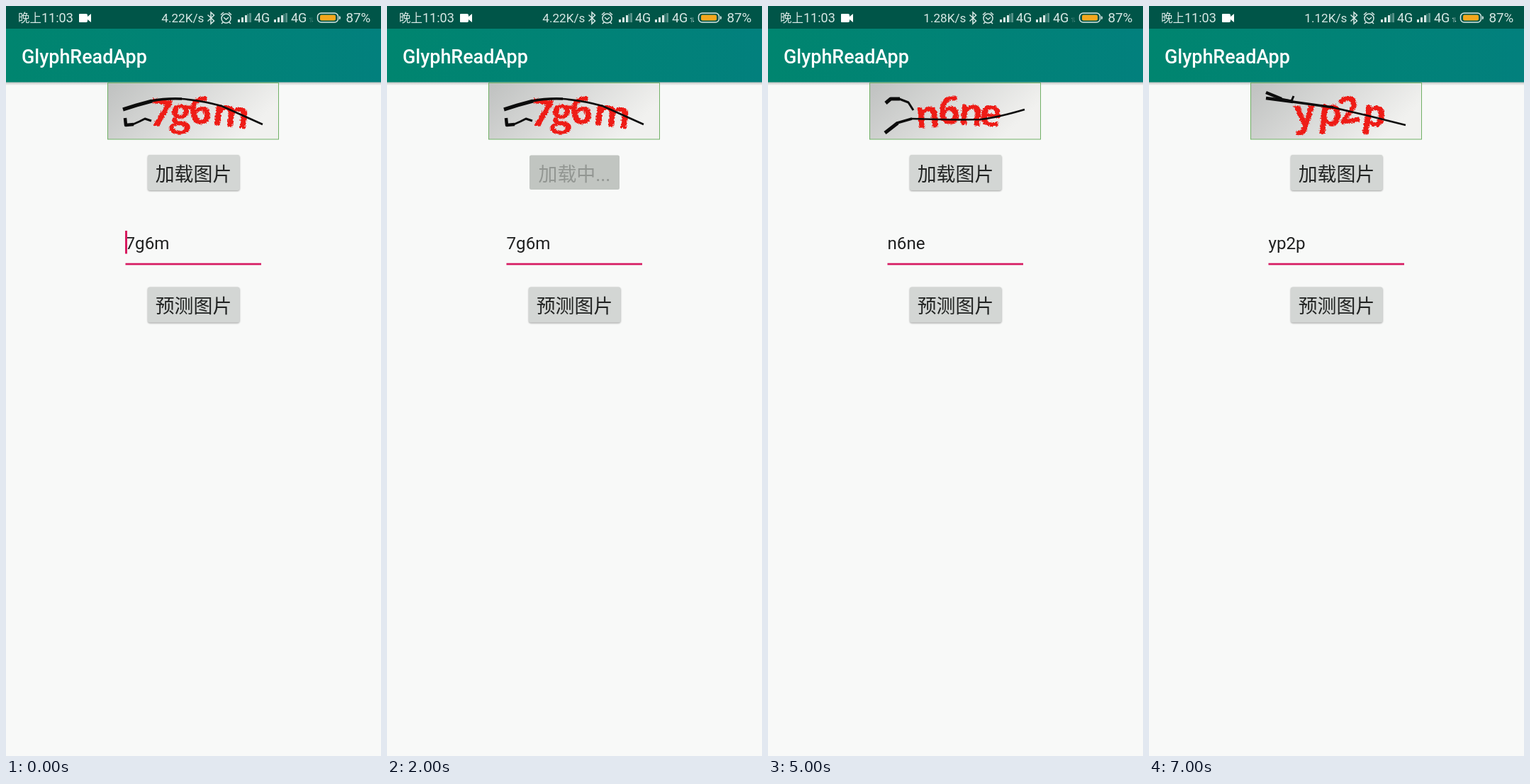
An HTML page that plays this animation: 529 px wide and 1058 px high, repeating every 8 s.

```html
<!DOCTYPE html>
<html lang="zh-CN">
<head>
<meta charset="utf-8">
<style>
html, body { margin: 0; width: 100%; height: 100%; overflow: hidden; background: #f8f9f8; }
svg { display: block; width: 100%; height: 100%; font-family: Roboto, "Noto Sans CJK SC", "Noto Sans CJK", sans-serif; }
.status { fill: #d8e8e5; font-size: 18px; }
.label { font-size: 26.9px; text-anchor: middle; fill: #212322; }
.code { font: 700 53px "Open Sans", sans-serif; text-anchor: middle; fill: #ee1a17; }
.ink { fill: none; stroke: #0c0c0c; stroke-linejoin: round; }
</style>
</head>
<body>
<svg viewBox="0 0 529 1058">
  <defs>
    <linearGradient id="bar"><stop stop-color="#00856f"/><stop offset="1" stop-color="#02807d"/></linearGradient>
    <linearGradient id="paper" x2="1" y2=".35"><stop stop-color="#bfc1c0"/><stop offset="1" stop-color="#f1f1ef"/></linearGradient>
    <linearGradient id="fade" x2="0" y2="1"><stop stop-color="#000" stop-opacity=".24"/><stop offset="1" stop-color="#000" stop-opacity="0"/></linearGradient>
    <filter id="rough">
      <feTurbulence baseFrequency=".35" numOctaves="1" seed="4"/>
      <feDisplacementMap in="SourceGraphic" scale="4" xChannelSelector="R" yChannelSelector="G"/>
    </filter>
    <filter id="soft" x="-10%" y="-20%" width="120%" height="140%"><feGaussianBlur stdDeviation="1.2"/></filter>
    <g id="signal">
      <path d="M0 19h3v4h-3zM5 16h3v7h-3zM10 13h3v10h-3z"/>
      <path d="M13.5 11h1.5v12h-1.5zM16 10h3v13h-3z" opacity=".4"/>
    </g>
  </defs>

  <rect width="529" height="1058" fill="#f8f9f8"/>
  <rect y="107" width="529" height="5" fill="url(#fade)"/>
  <rect y="32" width="529" height="75.5" fill="url(#bar)"/>
  <rect width="529" height="32" fill="#005548"/>
  <text x="22" y="81" font-size="26.9" font-weight="500" fill="#fff">GlyphReadApp</text>

  <g class="status">
    <text x="17" y="23" font-size="16.5" style="font-size:16.5px">晚上</text>
    <text x="50" y="23">11:03</text>
    <path d="M104 11h9q2 0 2 2v2l5-4v12l-5-4v2q0 2-2 2h-9q-1 0-1-1v-10q0-1 1-1z" fill="#fff"/>
    <text id="speed" x="279.5" y="23" text-anchor="end" style="font-size:17.2px"></text>
    <g fill="none" stroke="#d8e8e5" stroke-width="1.5">
      <path d="M284.500 12.500l9 8.500-4.500 4v-16l4.500 4-9 8.500"/>
      <circle cx="310.500" cy="17.500" r="6.500"/>
      <path d="M307 16l3.500 3 3.500-3M303 12.500l4-3.500M318 12.500l-4-3.500M306 23l-2 2M315 23l2 2"/>
      <rect x="439.500" y="10" width="29" height="13" rx="5"/>
    </g>
    <rect x="443" y="12.500" width="22" height="8" rx="2" fill="#f4a71d"/>
    <path d="M470 14q2 0 2 2.500t-2 2.500z"/>
    <use href="#signal" x="327"/>
    <use href="#signal" x="378"/>
    <text x="350" y="23">4G</text>
    <text x="402" y="23">4G</text>
    <path id="arrows" d="M429 23v-5h-1.500l2-2v7zM432 16v5h1.500l-2 2v-7z"/>
    <text x="479.500" y="23" style="font-size:18.8px">87%</text>
  </g>

  <rect x="143.500" y="108.500" width="241" height="79.500" fill="url(#paper)" stroke="#71b066"/>
  <g id="pictures"></g>

  <g id="buttons"></g>

  <text id="field" x="168.500" y="343" font-size="24.2" fill="#1f2020"></text>
  <rect x="168.500" y="362.700" width="191.500" height="2.700" fill="#d61a61"/>
  <rect id="cursor" x="168" y="317" width="3" height="32.500" fill="#d81b60"/>
</svg>

<script>
const $ = id => document.getElementById(id);

// glyphs: [x, baseline, tilt] per character; strokes: [width, path]
const codes = [
  { text: '7g6m',
    glyphs: [[215, 168, 7], [244, 167, 5], [274, 165, -5], [314, 169, 7]],
    strokes: [[5, 'M165 146L184 140L206 134'], [3.6, 'M205 134Q225 130 248 131'],
      [2.6, 'M247 131Q275 133 304 141L362 167'],
      [4.5, 'M168 158L169 168L180 167'], [3, 'M179 167L188 163L196 159L205 162']] },
  { text: 'n6ne',
    glyphs: [[225, 170, -4], [254, 165, 0], [284, 167, 4], [311, 168, 6]],
    strokes: [[5, 'M166 137L173 131L186 131'], [3, 'M185 131L198 136L205 147'],
      [5, 'M165 179L183 165'], [3.5, 'M182 165L203 159'],
      [2.6, 'M202 159Q255 161 300 160Q325 157 362 146']] },
  { text: 'yp2p',
    glyphs: [[219, 168, -3], [253, 167, 5], [283, 164, -8], [314, 168, 8]],
    strokes: [[4.5, 'M165 122L187 131'], [3, 'M186 131L201 134L204 127'],
      [4.5, 'M165 130L203 135'], [3.5, 'M202 135L260 143'], [2.6, 'M259 143L310 155L362 168']] }
];

$('pictures').innerHTML = codes.map(({ text, glyphs, strokes }) => '<g>' +
  '<g class="code" filter="url(#rough)">' + glyphs.map(([x, y, tilt], i) =>
    `<text transform="translate(${x} ${y}) rotate(${tilt})">${text[i]}</text>`).join('') + '</g>' +
  strokes.map(([w, d]) => `<path class="ink" stroke-width="${w}" d="${d}"/>`).join('') +
  '</g>').join('');

function button(y, text, busy) {
  const label = fill => `<text class="label" x="264.500" y="${y + 36.5}" style="fill:${fill}">${text}</text>`;
  if (busy) return `<rect x="201" y="${y + .5}" width="127" height="48.500" rx="2.500" fill="#c1c5c1"/>` + label('#929692');
  return `<rect x="200" y="${y + 1}" width="129.500" height="50" rx="3" opacity=".35" filter="url(#soft)"/>` +
    `<rect x="200" y="${y}" width="129.500" height="50" rx="2.700" fill="#d3d6d4"/>` + label('#212322');
}

// one entry per second: picture, predicted code, speed, data-arrow opacity
const steps = [
  [0, 0, 4.22, .4], [0, 0, 4.22, .6], [0, 0, 4.22, 1], [1, 0, 1.28, 1],
  [1, 1, 1.28, .6], [1, 1, 1.28, .4], [2, 1, 1.28, 1], [2, 2, 1.12, 1]
];
let shown = -1;

function draw() {
  const now = Math.floor(performance.now() % 8000 / 1000);
  if (now !== shown) {
    shown = now;
    const [picture, answer, speed, glow] = steps[now];
    [...$('pictures').children].forEach((g, i) => g.style.display = i === picture ? '' : 'none');
    const busy = now === 2;
    $('buttons').innerHTML = button(210, busy ? '加载中...' : '加载图片', busy) + button(396.5, '预测图片');
    $('field').textContent = codes[answer].text;
    $('speed').textContent = speed + 'K/s';
    $('arrows').style.opacity = glow;
    $('cursor').style.display = now ? 'none' : '';
  }
  requestAnimationFrame(draw);
}
draw();
</script>
</body>
</html>
```
